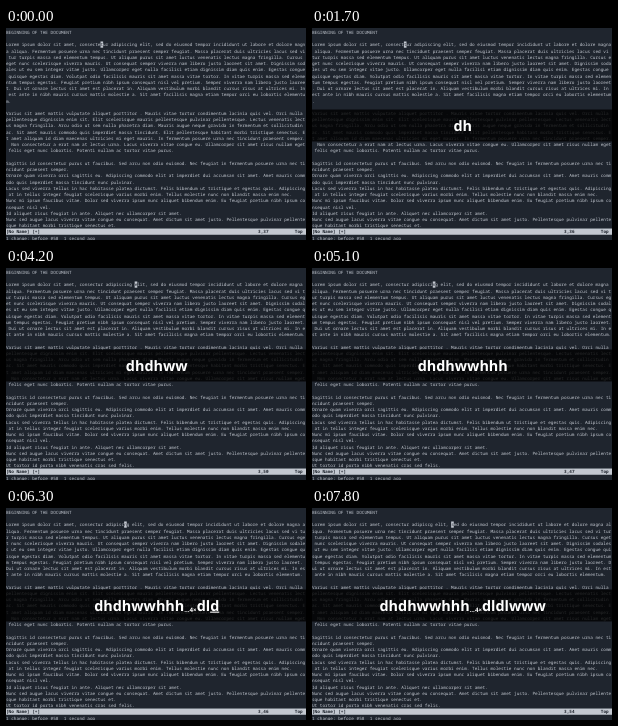
Recreate the animation shown at these times as an HTML page. Size 300 by 212 pixels, loop 8 s.

```html
<!DOCTYPE html>
<html lang="en">
<head>
<meta charset="utf-8">
<title>Editor with key display</title>
<style>
  html, body { margin: 0; width: 100%; height: 100%; overflow: hidden; background: #1f252e; }
  svg { display: block; width: 100vw; height: 100vh; }
  text { white-space: pre; text-rendering: geometricPrecision; }
  #screen { font: 13.333px "Noto Sans Mono", monospace; fill: #c3c8d0; }
  #screen .dark { fill: #1f252e; }
  #screen .bar { fill: #1f252e; font-weight: bold; }
  #keys { font: bold 14.4px "Noto Sans", "Open Sans", sans-serif; fill: #fff; text-anchor: middle; }
  #count { font-size: 6.2px; }
</style>
</head>
<body>
<svg viewBox="0 0 300 212" preserveAspectRatio="none">
  <rect width="300" height="212" fill="#1f252e"/>
  <g id="screen" transform="translate(0 1) scale(.32817)"></g>
  <g id="overlay">
    <rect y="81.5" width="300" height="32" fill="#000" opacity=".8"/>
    <text id="keys" x="150.7" y="102.7"><tspan id="head"></tspan><tspan id="count" dy="1"></tspan><tspan id="tail" dy="-1"></tspan></text>
    <rect id="underline" height="1.1" fill="#fff"/>
  </g>
</svg>
<script>
const LOOP = 8000, COLS = 114, ROWS = 32, CELL_W = 8, CELL_H = 19, BASE = 15;
const $ = id => document.getElementById(id);

const LINES = [
  'BEGINNING OF THE DOCUMENT',
  '',
  'Lorem ipsum dolor sit amet, consectetur adipiscing elit, sed do eiusmod tempor incididunt ut labore et dolore magna aliqua. ' +
  'Fermentum posuere urna nec tincidunt praesent semper feugiat. Massa placerat duis ultricies lacus sed vi tur turpis massa sed elementum tempus. ' +
  'Ut aliquam purus sit amet luctus venenatis lectus magna fringilla. Cursus eget nunc scelerisque viverra mauris. ' +
  'Ut consequat semper viverra nam libero justo laoreet sit amet. Dignissim sodales ut eu sem integer vitae justo. ' +
  'Ullamcorper eget nulla facilisi etiam dignissim diam quis enim. Egestas congue quisque egestas diam. ' +
  'Volutpat odio facilisis mauris sit amet massa vitae tortor. In vitae turpis massa sed elementum tempus egestas. ' +
  'Feugiat pretium nibh ipsum consequat nisl vel pretium. Semper viverra nam libero justo laoreet. ' +
  'Dui ut ornare lectus sit amet est placerat in. Aliquam vestibulum morbi blandit cursus risus at ultrices mi. ' +
  'In est ante in nibh mauris cursus mattis molestie a. Sit amet facilisis magna etiam tempor orci eu lobortis elementum.',
  '',
  'Varius sit amet mattis vulputate aliquet porttitor . Mauris vitae tortor condimentum lacinia quis vel. ' +
  'Orci nulla pellentesque dignissim enim sit. Elit scelerisque mauris pellentesque pulvinar pellentesque. ' +
  'Lectus venenatis lectus magna fringilla. Arcu odio ut sem nulla pharetra diam. ' +
  'Mauris augue neque gravida in fermentum et sollicitudin ac. Sit amet mauris commodo quis imperdiet massa tincidunt. ' +
  'Elit pellentesque habitant morbi tristique senectus. Et amet aliquam id diam maecenas ultricies mi eget mauris. ' +
  'In fermentum posuere urna nec tincidunt praesent semper.  Non consectetur a erat nam at lectus urna. ' +
  'Lacus viverra vitae congue eu. Ullamcorper sit amet risus nullam eget felis eget nunc lobortis. Potenti nullam ac tortor vitae purus.',
  '',
  'Sagittis id consectetur purus ut faucibus. Sed arcu non odio euismod. Nec feugiat in fermentum posuere urna nec tincidunt praesent semper.',
  'Ornare quam viverra orci sagittis eu. Adipiscing commodo elit at imperdiet dui accumsan sit amet. ' +
  'Amet mauris commodo quis imperdiet massa tincidunt nunc pulvinar.',
  'Lacus sed viverra tellus in hac habitasse platea dictumst. Felis bibendum ut tristique et egestas quis. ' +
  'Adipiscing at in tellus integer feugiat scelerisque varius morbi enim. Tellus molestie nunc non blandit massa enim nec.',
  'Nunc mi ipsum faucibus vitae. Dolor sed viverra ipsum nunc aliquet bibendum enim. Eu feugiat pretium nibh ipsum consequat nisl vel.',
  'Id aliquet risus feugiat in ante. Aliquet nec ullamcorper sit amet.',
  'Nunc sed augue lacus viverra vitae congue eu consequat. Amet dictum sit amet justo. ' +
  'Pellentesque pulvinar pellentesque habitant morbi tristique senectus et.',
  'Ut tortor id porta nibh venenatis cras sed felis.'
];
const EDIT_LINE = 2;
const CUTS = [35, 34, 45, 45];   // positions of the deleted characters, in order

// time, head keys, repeat count, tail keys, cursor column, deletions, underlined glyphs
const STEPS = [
  [0,    '',          '',    '',        37, 0, 0],
  [1400, 'dh',        '',    '',        36, 1, 0],
  [3500, 'dhdh',      '',    '',        35, 2, 0],
  [3900, 'dhdhw',     '',    '',        39, 2, 1],
  [4000, 'dhdhww',    '',    '',        50, 2, 1],
  [4600, 'dhdhwwh',   '',    '',        49, 2, 1],
  [4700, 'dhdhwwhh',  '',    '',        48, 2, 1],
  [4900, 'dhdhwwhhh', '',    '',        47, 2, 1],
  [5200, 'dhdhwwhhh', '…4×', '',        46, 2, 3],
  [5700, 'dhdhwwhhh', '…4×', 'd',       46, 2, 1],
  [5800, 'dhdhwwhhh', '…4×', 'dl',      46, 3, 2],
  [6300, 'dhdhwwhhh', '…4×', 'dld',     46, 3, 1],
  [6400, 'dhdhwwhhh', '…4×', 'dldl',    46, 4, 2],
  [7200, 'dhdhwwhhh', '…4×', 'dldlw',   48, 4, 1],
  [7400, 'dhdhwwhhh', '…4×', 'dldlww',  52, 4, 1],
  [7600, 'dhdhwwhhh', '…4×', 'dldlwww', 54, 4, 1]
];
const UNDERLINE_MS = 200, FADE_START = 1400, FADE = [.22, .5, .8, 1];

function add(name, attrs) {
  const node = document.createElementNS('http://www.w3.org/2000/svg', name);
  for (const key in attrs) node.setAttribute(key, attrs[key]);
  return $('screen').appendChild(node);
}
const addText = (col, row, cls = '') => add('text', { x: col * CELL_W, y: row * CELL_H + BASE, class: cls });

const rows = Array.from({ length: ROWS }, (_, i) => addText(0, i));
add('rect', { y: ROWS * CELL_H, width: 915, height: CELL_H });
addText(0, ROWS, 'bar').textContent = '[No Name] [+]';
const ruler = addText(96, ROWS, 'bar');
addText(110, ROWS, 'bar').textContent = 'Top';
addText(0, ROWS + 1).textContent = '1 change; before #58  1 second ago';
const cursor = add('rect', { y: EDIT_LINE * CELL_H, width: CELL_W, height: CELL_H });
const cursorChar = addText(0, EDIT_LINE, 'dark');

const cutAt = (line, i) => line.slice(0, i) + line.slice(i + 1);
const wrap = line => line.match(new RegExp(`.{1,${COLS}}`, 'g')) || [''];

function drawScreen(col, cuts) {
  const edited = CUTS.slice(0, cuts).reduce(cutAt, LINES[EDIT_LINE]);
  const wrapped = LINES.flatMap((line, i) => wrap(i === EDIT_LINE ? edited : line));
  rows.forEach((row, i) => { row.textContent = wrapped[i]; });
  cursor.setAttribute('x', (col - 1) * CELL_W);
  cursorChar.setAttribute('x', (col - 1) * CELL_W);
  cursorChar.textContent = edited[col - 1];
  ruler.textContent = `3,${col}`;
}

function drawKeys(head, count, tail, marked) {
  $('head').textContent = head;
  $('count').textContent = count;
  $('tail').textContent = tail;
  const line = $('underline');
  line.setAttribute('visibility', marked ? 'visible' : 'hidden');
  if (!marked) return;
  const total = (head + count + tail).length;
  const left = $('keys').getStartPositionOfChar(total - marked).x;
  const right = $('keys').getEndPositionOfChar(total - 1).x;
  line.setAttribute('x', left);
  line.setAttribute('width', right - left);
  line.setAttribute('y', count && !tail ? 104.4 : 103.6);
}

let shown = '';
function render(t) {
  const index = STEPS.findLastIndex(step => step[0] <= t);
  const [start, head, count, tail, col, cuts, marks] = STEPS[index];
  const marked = t - start < UNDERLINE_MS ? marks : 0;
  const fade = Math.min(FADE.length - 1, Math.floor((t - FADE_START) / 100));
  $('overlay').setAttribute('opacity', FADE[fade] || 0);
  const state = `${index}/${marked}`;
  if (state === shown) return;
  shown = state;
  drawScreen(col, cuts);
  drawKeys(head, count, tail, marked);
}

const origin = performance.now();
function tick() {
  render((performance.now() - origin) % LOOP);
  requestAnimationFrame(tick);
}
tick();
</script>
</body>
</html>
```
